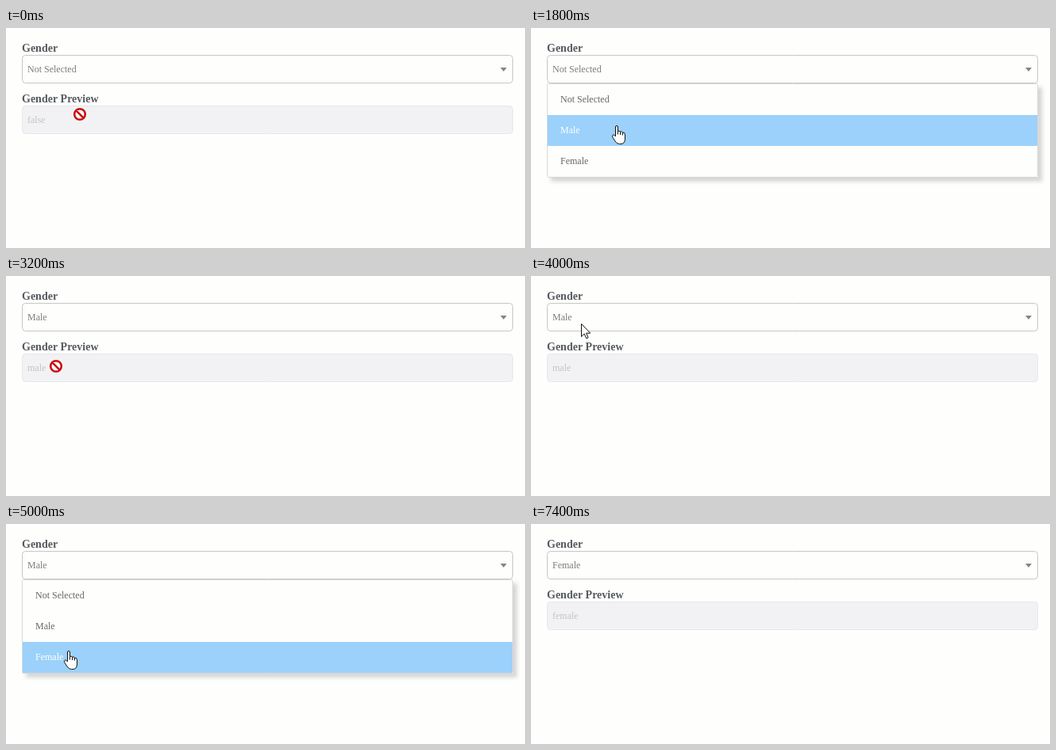
Recreate the animation shown at these times as an HTML page with a canvas. Size 654 px wide and 278 px high, loop 8000 ms.

```html
<!DOCTYPE html>
<html lang="en">
<head>
<meta charset="utf-8">
<title>Gender dropdown</title>
<style>
  html, body { margin: 0; width: 100%; height: 100%; overflow: hidden; background: #fefefd; }
  canvas { display: block; }
</style>
</head>
<body>
<canvas id="stage" width="654" height="278"></canvas>
<script>
const ctx = document.getElementById('stage').getContext('2d');
const LOOP = 8000, STEP = 200;
const SERIF = '"Liberation Serif", "Times New Roman", serif';
const PAPER = '#fefefd';
const OPTIONS = ['Not Selected', 'Male', 'Female'];
const ROW = 39, LIST_TOP = 71;

// Each click toggles the menu; every second one picks the next option.
const CLICKS = [800, 2200, 4200, 5400];

const stop = (at, x, y, rest = 0) => ({ at, x, y, leave: at + rest });
const STOPS = [
  stop(0, 93, 109),
  stop(1000, 98, 59, 400),
  stop(1800, 108, 123),
  stop(2600, 106, 140),
  stop(3200, 63, 114),
  stop(3800, 60, 50),
  stop(4600, 79, 111),
  stop(5000, 79, 160, 200),
  stop(6200, 27, 147),
  stop(7000, 138, 170),
  stop(7400, 138, 300)
];

const smooth = k => k * k * (3 - 2 * k);

function pointerAt(t) {
  const i = STOPS.findLastIndex(s => s.at <= t);
  const from = STOPS[i], to = STOPS[i + 1] || from;
  const k = t <= from.leave || to === from ? 0 : smooth((t - from.leave) / (to.at - from.leave));
  const mix = (a, b) => Math.round(a + (b - a) * k);
  return [mix(from.x, to.x), mix(from.y, to.y)];
}

function text(str, x, y, color, font = '12px ') {
  ctx.font = font + SERIF;
  ctx.fillStyle = color;
  ctx.fillText(str, x, y);
}

function box(y, h, radius, fill, stroke) {
  ctx.beginPath();
  ctx.roundRect(20.5, y + 0.5, 618, h - 1, radius);
  ctx.fillStyle = fill;
  ctx.fill();
  ctx.lineWidth = 1;
  ctx.strokeStyle = stroke;
  ctx.stroke();
}

function drawForm(choice) {
  text('Gender', 20, 30, '#555a5f', 'bold 14px ');
  box(34, 36, 4, PAPER, '#c6c6c6');
  text(OPTIONS[choice], 27, 56, '#7c7c7c');
  ctx.fillStyle = '#858585';
  ctx.fill(new Path2D('M623 50h8l-4 5z'));
  text('Gender Preview', 20, 94, '#555a5f', 'bold 14px ');
  box(98, 36, 4, '#f2f2f4', '#e7e7ea');
  text(choice ? OPTIONS[choice].toLowerCase() : 'false', 27, 120, '#c4c4c6');
}

function drawMenu(hover) {
  ctx.save();
  ctx.shadowColor = 'rgba(0,0,0,.16)';
  ctx.shadowBlur = 5;
  ctx.shadowOffsetX = ctx.shadowOffsetY = 5;
  ctx.fillStyle = PAPER;
  ctx.fillRect(20, 70, 619, 119);
  ctx.restore();
  box(70, 119, 1, PAPER, '#d8d8d8');
  OPTIONS.forEach((label, i) => {
    const y = LIST_TOP + i * ROW;
    if (i === hover) {
      ctx.fillStyle = '#9bd1fb';
      ctx.fillRect(21, y, 617, ROW);
    }
    text(label, 37, y + 23, i === hover ? '#fff' : '#666');
  });
}

const ARROW = new Path2D('M.5 .5V16.7L4.2 13.1L6.8 18.9L9.1 17.9L6.6 12.2H11.7Z');
const HAND = new Path2D('M-1.5 14V2Q-1.5 .5 0 .5T1.5 2V7.5Q3 6.5 4.5 8Q6.5 7.3 7.5 9' +
  'Q10.5 8.5 10.5 12V17Q10.5 23.5 5 23.5H3.5Q0 23.5 -2 20L-5.5 14.5' +
  'Q-6 12.5 -4.5 12Q-3 11.8 -1.5 14Z');
const KNUCKLES = new Path2D('M1.5 7.5V11.5M4.5 8V12M7.5 9V12.5');

function drawPointer(kind, x, y) {
  ctx.save();
  ctx.translate(x, y);
  ctx.lineWidth = 1;
  ctx.lineJoin = 'round';
  ctx.strokeStyle = '#111';
  ctx.fillStyle = '#fff';
  if (kind === 'blocked') {
    ctx.strokeStyle = '#c90d12';
    ctx.lineWidth = 2.6;
    ctx.beginPath();
    ctx.arc(0, 0, 6.8, 0, Math.PI * 2);
    ctx.fill();
    ctx.moveTo(-4.8, -4.8);
    ctx.lineTo(4.8, 4.8);
    ctx.stroke();
  } else {
    const shape = kind === 'hand' ? HAND : ARROW;
    ctx.fill(shape);
    ctx.stroke(shape);
    if (kind === 'hand') ctx.stroke(KNUCKLES);
  }
  ctx.restore();
}

function render(time) {
  const t = Math.floor((time % LOOP) / STEP) * STEP;
  const clicks = CLICKS.filter(c => c <= t).length;
  const open = clicks % 2 === 1;
  const [x, y] = pointerAt(t);
  const overMenu = open && y > LIST_TOP && y < 188;
  const overPreview = !open && y >= 98 && y < 134;

  ctx.fillStyle = PAPER;
  ctx.fillRect(0, 0, 654, 278);
  drawForm(Math.floor(clicks / 2));
  // The highlight trails the pointer by a couple of pixels.
  if (open) drawMenu(overMenu ? Math.floor((y - 2 - LIST_TOP) / ROW) : -1);
  drawPointer(overMenu ? 'hand' : overPreview ? 'blocked' : 'arrow', x, y);
}

const start = performance.now();
function tick() {
  render(performance.now() - start);
  requestAnimationFrame(tick);
}
tick();
</script>
</body>
</html>
```
